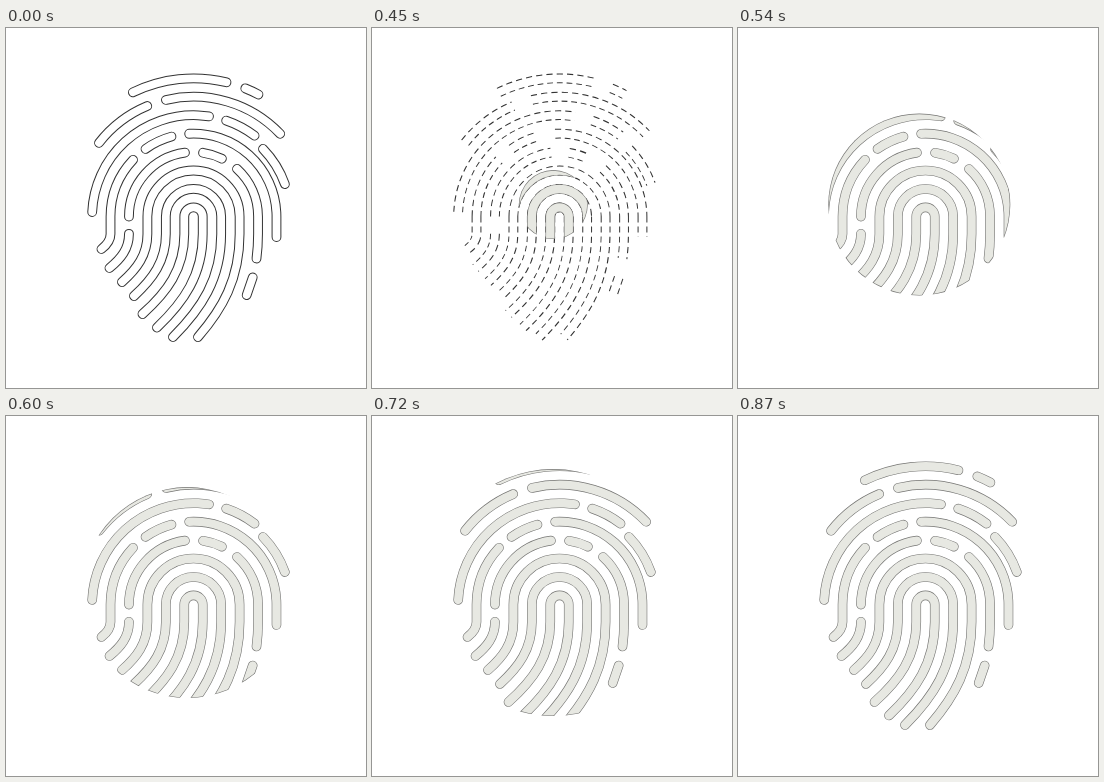
An HTML page with a canvas for the animation above (1590 ms loop, 360 by 360 pixels).

```html
<!DOCTYPE html>
<html lang="en">
<head>
<meta charset="utf-8">
<title>Fingerprint</title>
<style>
  html, body { margin: 0; width: 100%; height: 100%; overflow: hidden; background: #fff; }
  canvas { display: block; width: 360px; height: 360px; }
</style>
</head>
<body>
<canvas id="stage" width="360" height="360"></canvas>
<script>
const ctx = document.getElementById('stage').getContext('2d');
const CX = 187.5, CY = 188.6, GAP = 18.44, WIDTH = 9.6;
const LOOP = 1590, START = 420, STEP = 30, GROW = 450;
const SPOT = { x: 181.3, y: 176.6 };
const GROWTH = [[0, 13], [60, 56], [120, 91], [180, 105.5], [300, 123.5], [GROW, 145]];

const ridges = new Path2D();
const radius = ring => GAP * (ring + 0.5);

// Angles in degrees, -180 is left and 0 is right
function addArc(ring, from, to) {
  const r = radius(ring), a = from * Math.PI / 180, b = to * Math.PI / 180;
  ridges.moveTo(CX + r * Math.cos(a), CY + r * Math.sin(a));
  ridges.arc(CX, CY, r, a, b);
}

// Drops straight down from the top, then bends towards its end
function addLeg(lane, ex, ey, top = CY) {
  const x = CX + (lane - 4.5) * GAP, bend = 206;
  const dx = x - ex, dy = ey - bend;
  ridges.moveTo(x, top);
  ridges.lineTo(x, bend);
  ridges.bezierCurveTo(x, bend + 0.44 * dy, ex + 0.58 * dx, ey - 0.27 * dy, ex, ey);
}

for (let ring = 0; ring < 3; ring++) addArc(ring, -180, 0);
const spans = {
  3: [[-180, -97.6], [-81.5, -63.9], [-47.6, 0]],
  4: [[-180, -136.8], [-125.3, -105.4], [-93, 0]],
  5: [[-177.4, -81.2], [-71.2, -53]],
  4.76: [[-44.2, -19.6]],
  6: [[-142, -112.7], [-103.3, -43.7]],
  7: [[-116, -76.2], [-68, -62]]
};
for (const ring in spans) {
  for (const [from, to] of spans[ring]) addArc(+ring, from, to);
}

addLeg(0, 95.5, 221);
addLeg(1, 103.5, 240, 205.8);
addLeg(2, 116, 254);
addLeg(3, 128, 268);
addLeg(4, 136.5, 286);
addLeg(5, 151, 299.5);
addLeg(6, 167, 309);
addLeg(7, 192, 309);
addLeg(8, 250.5, 230.5);
addLeg(9, 270.5, 209);
ridges.moveTo(246.7, 249.5);
ridges.lineTo(240.7, 267);

function stroke(color, width) {
  ctx.strokeStyle = color;
  ctx.lineWidth = width;
  ctx.stroke(ridges);
}

// The outline breaks up into dashes as it fades
function drawOutline(part) {
  if (part < 1) {
    ctx.lineCap = 'butt';
    ctx.setLineDash([10 * part, 10 * (1 - part)]);
  }
  stroke('#333', WIDTH + 0.2);
  ctx.setLineDash([]);
  ctx.lineCap = 'round';
  stroke('#fff', WIDTH - 1.8);
}

function inSpot(r, color, width) {
  ctx.save();
  ctx.beginPath();
  ctx.arc(SPOT.x, SPOT.y, r, 0, 2 * Math.PI);
  ctx.clip();
  stroke(color, width);
  ctx.restore();
}

function spotRadius(t) {
  const i = GROWTH.findIndex(([end], n) => n && t <= end);
  const [t0, r0] = GROWTH[i - 1], [t1, r1] = GROWTH[i];
  return r0 + (r1 - r0) * (t - t0) / (t1 - t0);
}

function draw(t) {
  ctx.fillStyle = '#fff';
  ctx.fillRect(0, 0, 360, 360);
  ctx.lineCap = 'round';
  const age = Math.min(Math.floor((t - START) / STEP) * STEP, GROW);
  const part = Math.min(1, 1 - age / 75);
  if (part > 0) drawOutline(part);
  if (age >= 0) {
    const r = spotRadius(age);
    inSpot(r, '#747472', WIDTH);
    inSpot(r - 0.6, '#e7e8e2', WIDTH - 1.2);
  }
}

const begin = performance.now();
function tick() {
  draw((performance.now() - begin) % LOOP);
  requestAnimationFrame(tick);
}
tick();
</script>
</body>
</html>
```
